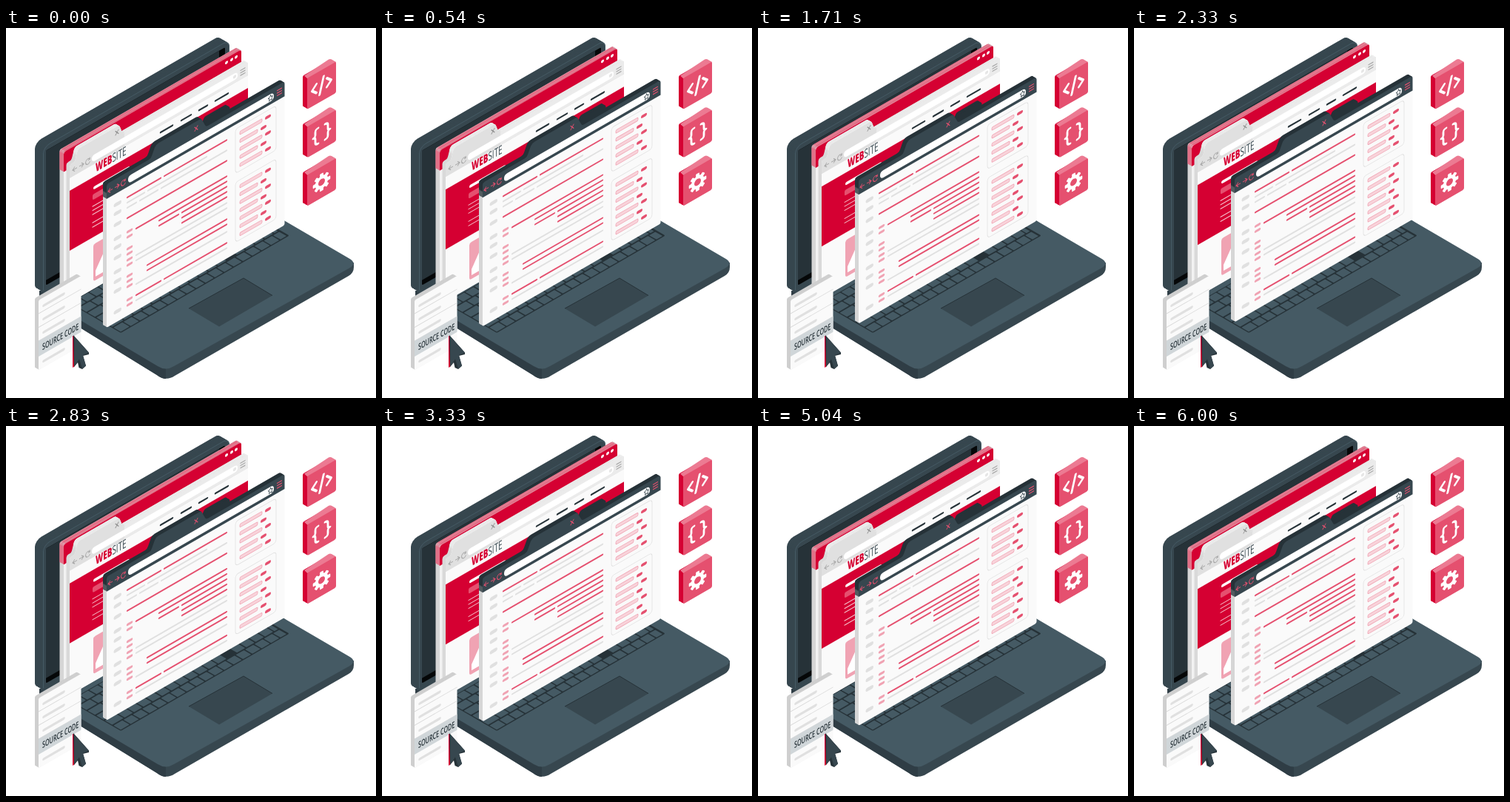
These frames come from a looping animation (500 px wide and 500 px high, 6040 ms). An HTML page:

```html
<!DOCTYPE html>
<html lang="en">
<head>
<meta charset="utf-8">
<title>Source code</title>
<style>
  html, body { margin: 0; width: 100%; height: 100%; overflow: hidden; background: #fff; }
  svg { display: block; width: 100vw; height: 100vh; }
  text { font-family: "Open Sans", "Noto Sans", sans-serif; }
</style>
</head>
<body>
<svg id="stage" viewBox="0 0 500 500"></svg>
<script>
const RED = '#d50032', PINK = '#e5506f', PALE = '#f0a3b3';
const SLATE = '#455a64', DARK = '#37474f', NIGHT = '#263238';
const PAPER = '#fafafa', GREY = '#e0e0e0';
const SLOPE = 0.577;

// Isometric wall: x stays the screen x, y equals the screen y at x0.
const wall = (x0, body) =>
  `<g transform="matrix(1 ${-SLOPE} 0 1 0 ${SLOPE * x0})">${body}</g>`;
const shift = (x, y, body) => `<g transform="translate(${x} ${y})">${body}</g>`;
const path = (d, fill) => `<path d="${d}" fill="${fill}"/>`;
const stroke = (d, color, width, extra = '') =>
  `<path d="${d}" fill="none" stroke="${color}" stroke-width="${width}" ${extra}/>`;
const rect = (x, y, w, h, fill, r = 0, extra = '') =>
  `<rect x="${x}" y="${y}" width="${w}" height="${h}" rx="${r}" fill="${fill}" ${extra}/>`;
const line = (x1, x2, y, color, width = 2.2) =>
  stroke(`M${x1} ${y}H${x2}`, color, width, 'stroke-linecap="round"');
const dot = (x, y, r, fill) => `<circle cx="${x}" cy="${y}" r="${r}" fill="${fill}"/>`;
const each = (list, draw) => list.map(draw).join('');

// Copies of a wall shape stepped back, giving it thickness.
function extrude(x0, depth, draw) {
  let out = '';
  for (let d = depth; d > 0; d -= 0.5) out += shift(-d, -d * SLOPE, wall(x0, draw()));
  return out;
}

function lid() {
  const face = fill => rect(50, 161, 252, 201, fill, 9);
  return extrude(50, 11, () => face(DARK)) + wall(50,
    face(SLATE) +
    rect(51, 162, 250, 199, DARK, 8) +
    rect(54, 168, 242, 182, '#050708', 2) +
    rect(54, 168, 234, 175, NIGHT));
}

function keyboard() {
  const rows = 6, pitch = 13.4;
  let keys = rect(0, 0, 263, 81, NIGHT, 2);
  for (let row = 0; row < rows; row++) {
    const inset = [0, 4, 7, 10, 5, 1][row];
    let u = 1.5;
    for (let i = 0; u < 260; i++) {
      const w = Math.min(i ? 14.6 : 14.6 + inset, 262 - u);
      const gap = row === 4 && u > 176 && u < 196;
      if (!gap && w > 4) keys += rect(u, row * pitch + 1, w - 1.8, pitch - 2, SLATE, 1);
      u += w;
    }
  }
  return `<g transform="matrix(.866 -.5 .866 .5 85 371.5)">${keys}</g>`;
}

function base() {
  return path('M45 355V371L204 469Q216 478 228 470L463 335Q470 331 470 323V317Z', DARK) +
    path('M45 355V371L204 469Q210 474 216 474V455Z', '#2f3d45') +
    path('M45 362L302 217L463 311Q476 318 463 325L227 457Q216 464 205 457Z', SLATE) +
    keyboard() +
    path('M247 379L321 338L360 361.5L288 403.5Z', DARK) +
    stroke('M247 379L321 338L360 361.5', NIGHT, 1);
}

// Back, forward and reload signs of a browser bar.
function navSigns(x, y, color) {
  return stroke(`M${x + 6} ${y}h-6m3 -3l-3 3l3 3` +
      `M${x + 9} ${y}h6m-3 -3l3 3l-3 3`, color, 1) +
    stroke(`M${x + 23} ${y - 2}a3 3.6 0 1 0 .4 3.4m-.2 -5.4v2.6h-2.4`, color, 1);
}
const cross = (x, y, color) => stroke(`M${x - 2.3} ${y - 3}l4.6 6m0 -6l-4.6 6`, color, 1);
const menu = (x, y, color) =>
  each([-3.3, 0, 3.3], d => line(x - 3, x + 3, y + d, color, 1.3));

function website() {
  const back = fill => rect(78, 163, 240, 208, fill, 2);
  const redTop = fill => path('M78 190V166Q78 163 81 163H315Q318 163 318 166V190Z', fill);
  const sheet = fill => path('M86 371V188Q86 185 89 185H91Q93 185 94 181L96 174Q97 170 101 170' +
    'H150Q153 170 154 173L157 182Q158 185 160 185H324Q327 185 327 188V371Z', fill);

  const page =
    sheet(PAPER) +
    path('M86 203V188Q86 185 89 185H91Q93 185 94 181L96 174Q97 170 101 170' +
      'H150Q153 170 154 173L157 182Q158 185 160 185H324Q327 185 327 188V203Z', GREY) +
    rect(160, 185, 167, 18, '#ebebeb', 2) +
    rect(116, 190, 197, 9, '#fff', 4) +
    navSigns(90, 194.5, '#a6a6a6') + cross(150, 178, '#8c8c8c') +
    dot(309, 194.5, 2.2, '#e6e6e6') + menu(320, 194, '#a6a6a6') +
    each([[208, 226], [236, 251], [260, 273], [282, 301]], ([a, b]) =>
      line(a + 1, b - 1, 212, NIGHT, 2.4)) +
    `<g transform="translate(121 215) scale(.62 1)"><text font-size="16" fill="${DARK}">` +
      `<tspan font-weight="800" fill="${RED}">WEB</tspan>SITE</text></g>` +
    rect(86, 220, 241, 81, RED) +
    line(120, 165, 235, '#fff', 4) +
    rect(117, 243, 36, 7.5, PINK, 2) +
    each([259, 264.5, 270, 281, 287], y => line(117, 166, y, '#f6c4ce', 1.1)) +
    rect(118, 311, 52, 50, PALE, 3) +
    path('M121 356V348L133 328L148 356Z', '#fff');

  return extrude(86, 5.5, () => back('#d6d6d6') + redTop(PINK)) +
    wall(86, back('#f2f2f2') + redTop(RED) +
      each([298, 305, 311], x => dot(x, 169, 2, '#fff'))) +
    extrude(86, 4.5, () => sheet('#d9d9d9') +
      path('M95 182L96 174Q97 170 101 170H150Q153 170 154 173L157 182Z', '#f0f0f0') +
      rect(160, 185, 167, 5, '#f0f0f0', 2)) +
    wall(86, page);
}

function code() {
  const bar = fill => path('M136 231V214Q136 211 139 211H193Q196 211 197 208L201 199Q203 196 206 196' +
    'H261Q264 196 265 199L269 208Q270 211 273 211H373.5Q376.5 211 376.5 214V231Z', fill);
  const spareTab = path('M268 212L272 204Q273 202 275 202H300Q303 202 303 205V212Z', NIGHT);
  const sheet = fill => rect(136, 222, 240.5, 183, fill, 2);

  const rows = [
    [245, PINK, 163, 210, 213, 299], [252, GREY, 163, 188, 191, 272],
    [259, GREY, 163, 177, 180, 206, 209, 299], [273, PINK, 163, 299],
    [294, PINK, 175, 299], [301, PINK, 206, 299], [308, PINK, 206, 234, 237, 299],
    [315, PINK, 237, 299], [322, PINK, 237, 299],
    [330, GREY, 175, 299], [337, GREY, 175, 299],
    [352, PINK, 190, 299], [359, PINK, 190, 299], [369, GREY, 175, 299],
    [384, PINK, 175, 210, 213, 299], [391, GREY, 175, 299]
  ];
  const codeRow = ([y, color, ...ends]) => each(ends, (x, i) =>
    i % 2 ? '' : line(x + 1, ends[i + 1] - 1, y, color));

  const panel = (top, height, count) => {
    let out = rect(310, top, 55, height, 'none', 4, `stroke="${GREY}" stroke-width=".8"`);
    for (let i = 0; i < count; i++) {
      const y = top + 9 + i * 10.8;
      out += rect(316, y - 2.3, i % 2 ? 24 : 30, 4.4, '#f8d3da', 1.5,
          `stroke="${PALE}" stroke-width=".8"`) +
        line(i % 2 ? 346 : 352, i % 2 ? 350 : 356, y, PINK, 4);
    }
    return out;
  };

  const page = sheet(PAPER) + bar(DARK) +
    rect(165, 217, 197, 10, '#fff', 4.5) +
    navSigns(138, 222, PINK) + cross(257, 205.5, PINK) + menu(369.5, 221, PINK) +
    stroke('M357.5 218.5l1 2.3l2 .3l-1.4 2l.3 2.6l-1.9 -1.2l-1.9 1.2l.3 -2.6l-1.4 -2l2 -.3z', DARK, .8) +
    each(rows, codeRow) +
    each([246, 258, 273, 292, 304, 318, 337, 350, 363, 391], y => line(148, 153.5, y, GREY, 5)) +
    each([292, 299, 315, 322, 330, 337, 352, 359, 366, 384, 391], y =>
      line(164.5, 169.5, y, PALE, 3.4)) +
    panel(237, 60, 5) + panel(309, 81, 7);

  return extrude(136, 5, () => spareTab + sheet('#d6d6d6') + bar(NIGHT)) + wall(136, page);
}

function card() {
  const face = fill => rect(44, 368, 57.5, 94.5, fill, 2);
  return extrude(44, 5, () => face('#cfcfcf')) + wall(44,
    face(PAPER) +
    each([386, 404.5, 423], y => stroke(`M44 ${y}H101.5`, '#d6d6d6', .8)) +
    each([379, 397, 415, 454], y => line(51, 78, y, GREY, 3.6)) +
    rect(44, 423, 57.5, 21, '#d0d6d9') +
    `<g transform="translate(49 438.5) scale(.6 1)"><text font-size="12" font-weight="600" fill="${NIGHT}">SOURCE CODE</text></g>`);
}

const cursor = () =>
  path('M90 416L93 417V457L90 459Z', RED) +
  path('M91 415L112 438.5L112 441L104 443L108 456.5L103 461L98.5 459L97 452L92 458Z', NIGHT) +
  path('M92.5 417L112 439L104 442L108 456.5L103 460.5L99 447.5L92.5 457Z', DARK);

function icon(y, glyph) {
  const face = fill => rect(407, y, 39, 42, fill, 2);
  return extrude(407, 6, () => face(RED)) +
    path(`M403 ${y - 3.5}L436 ${y - 25.5}Q438 ${y - 26.5} 440 ${y - 25.5}L446 ${y - 22}L408 ${y + 1}Z`, '#ec7a92') +
    wall(407, face(PINK) + shift(426.5, y + 21, glyph));
}

function icons() {
  const pen = 'stroke-linecap="round" stroke-linejoin="round"';
  const tag = stroke('M-7 -6L-13 0L-7 6M7 -6L13 0L7 6M2.8 -11L-2.8 11', '#fff', 3, pen);
  const brace = 'M-4.5 -10.5Q-8.5 -10.5 -8.5 -7V-3Q-8.5 0 -11.5 0Q-8.5 0 -8.5 3V7Q-8.5 10.5 -4.5 10.5';
  const braces = stroke(brace, '#fff', 2.8, pen) +
    `<g transform="scale(-1 1)">${stroke(brace, '#fff', 2.8, pen)}</g>`;
  let gear = `<circle r="6.6" fill="none" stroke="#fff" stroke-width="4.2"/>`;
  for (let a = 0; a < 360; a += 45)
    gear += `<g transform="rotate(${a})">${rect(-2.4, -11.8, 4.8, 5, '#fff', 1)}</g>`;
  return icon(68, tag) + icon(133.3, braces) + icon(198.6, gear);
}

const stage = document.getElementById('stage');
stage.innerHTML = lid() + base() +
  `<g id="windows">${website()}${code()}</g>` + card() + cursor() + icons();
const windows = document.getElementById('windows');

// Both windows float together at constant speed, 10 px up and back.
const LOOP = 6040, TOP_TIME = 2520, TRAVEL = 10, START_LIFT = 1.66;
function render(time) {
  const away = Math.abs(time % LOOP - TOP_TIME);
  const lift = TRAVEL * (1 - Math.min(away, LOOP - away) / (LOOP / 2));
  windows.setAttribute('transform', `translate(0 ${(START_LIFT - lift).toFixed(2)})`);
}

const start = performance.now();
function tick(now) {
  render(Math.max(0, now - start));
  requestAnimationFrame(tick);
}
render(0);
requestAnimationFrame(tick);
</script>
</body>
</html>
```
